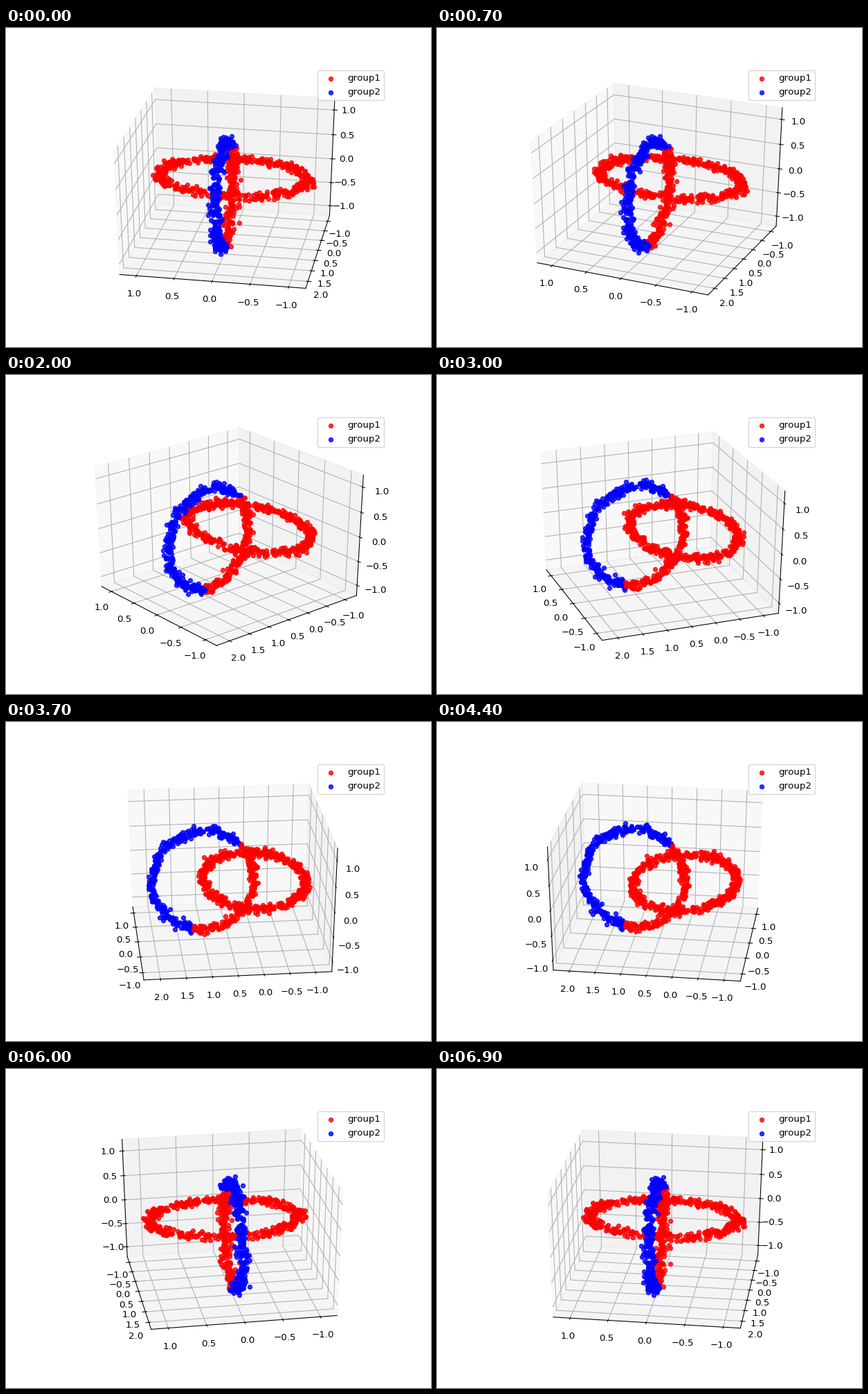
Recreate the animation shown at these times as a matplotlib script. Size 614 by 460 pixels, loop 7000 ms.

```python
import math

import numpy as np
import matplotlib.pyplot as plt
from matplotlib.animation import FuncAnimation
from mpl_toolkits.mplot3d import Axes3D

W, H, DPI = 614, 460, 96
FRAMES, INTERVAL = 70, 100
NOISE = 0.041

# Letter spacing rounded to whole pixels.
plt.rcParams["text.kerning_factor"] = 6


class StretchedAxes(Axes3D):
    """3D axes that fill their whole rectangle instead of a square."""

    def apply_aspect(self, position=None):
        pass


def ring(rng, count, start, stop, place):
    """Noisy points on an arc; place maps the angle to x, y, z."""
    angle = np.radians(rng.uniform(start, stop, count))
    points = np.array(np.broadcast_arrays(*place(angle)))
    return points + rng.normal(0, NOISE, points.shape)


def flat(a):
    return np.cos(a), np.sin(a), 0.0


def upright(a):
    return 0.0, 1 + np.cos(a), np.sin(a)


rng = np.random.default_rng(4)
split_low, split_high = -80, 136
red = np.hstack([
    ring(rng, 500, 0, 360, flat),
    ring(rng, 200, split_high, split_low + 360, upright),
])
blue = ring(rng, 300, split_low, split_high, upright)

fig = plt.figure(figsize=(W / DPI, H / DPI), dpi=DPI)
# Margins belong to a 6.4 x 4.8 inch page.
kx, ky = 6.4 * DPI / W, 4.8 * DPI / H
ax = fig.add_axes([0.125 * kx, 0.11 * ky, 0.775 * kx, 0.77 * ky],
                  axes_class=StretchedAxes)
ax.viewLim.intervalx = (-0.095, 0.09)
ax.viewLim.intervaly = (-0.095, 0.09)

for points, color, label in ((red, "red", "group1"), (blue, "blue", "group2")):
    ax.scatter(*points, c=color, alpha=0.8, depthshade=False, label=label)

ax.set_xlim(-1.222, 1.222)
ax.set_ylim(-1.316, 2.319)
ax.set_zlim(-1.213, 1.232)
ax.set_xticks(np.arange(-1, 1.1, 0.5))
ax.set_yticks(np.arange(-1, 2.1, 0.5))
ax.set_zticks(np.arange(-1, 1.1, 0.5))
ax.set_box_aspect((1, 1, 1), zoom=math.sqrt(3) / 1.8294640721620434)
ax.legend(loc="upper right")


def update(i):
    # The camera sweeps from 68 to 206 degrees, then jumps back.
    ax.view_init(elev=30, azim=68 + 2 * ((i + 16) % FRAMES))
    return []


anim = FuncAnimation(fig, update, frames=FRAMES, interval=INTERVAL,
                     repeat=True, repeat_delay=0, blit=False)
plt.show()
```
